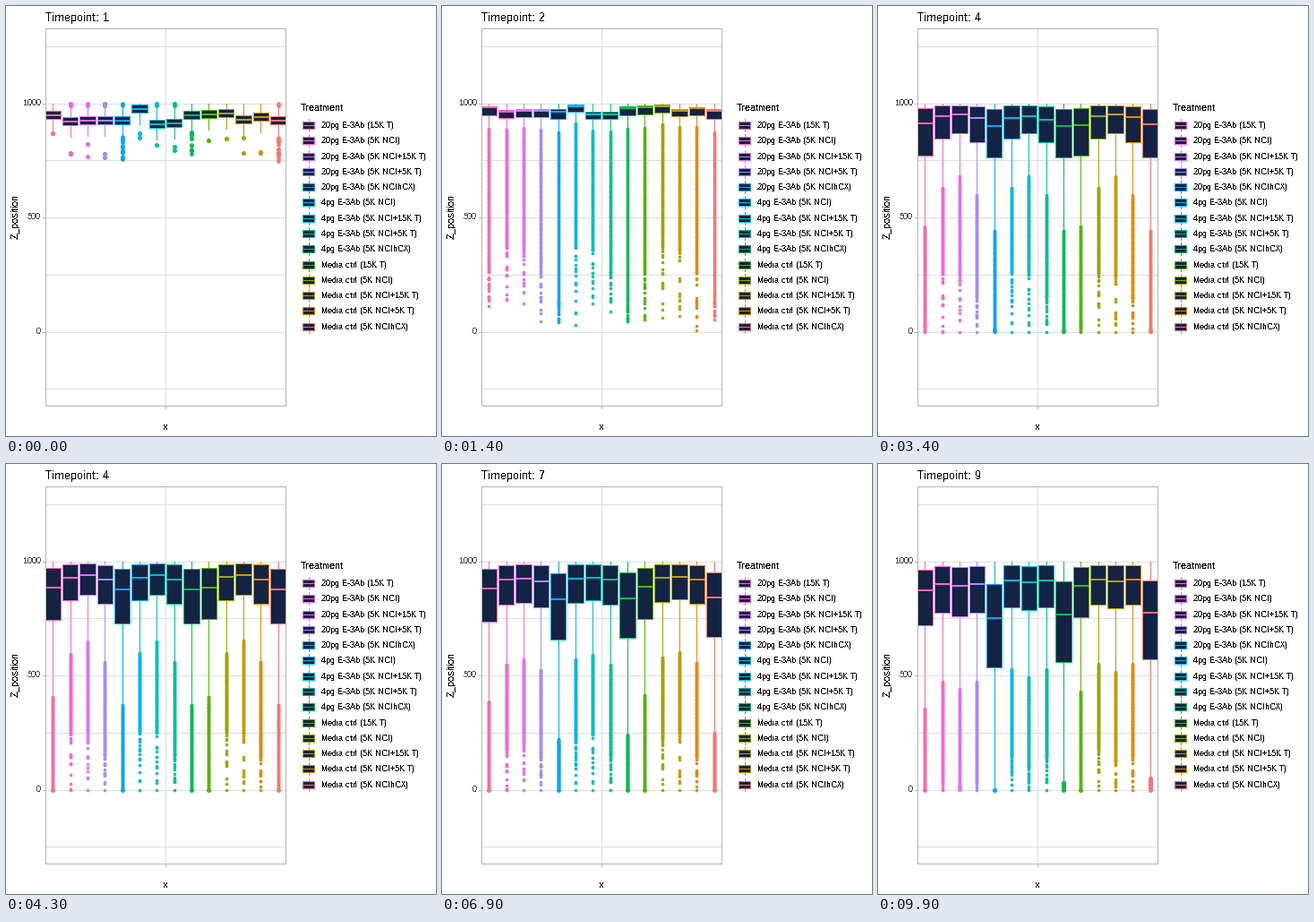
Write a matplotlib script that moves like this. It is 480 px wide and 480 px high and loops after 10000 ms.

```python
import numpy as np
import matplotlib.pyplot as plt
from matplotlib.animation import FuncAnimation
from matplotlib.patches import Rectangle

SIZE, DPI, FRAMES = 480, 72, 100
LEFT, RIGHT, TOP, BOTTOM, MIDDLE = 44, 312, 24, 445, 178
NAVY, BORDER, GRID = "#132343", "#B3B3B3", "#DEDEDE"
COLORS = ["#FF66A8", "#FB61D7", "#DF70F8", "#A58AFF", "#06A4FF", "#00B6EB", "#00BFC4",
          "#00C094", "#00BC56", "#53B400", "#99A800", "#C49A00", "#E38900", "#F8766D"]

# Cells: lower hinge depth below 1000 early and late, height where outliers thin out
CELLS = {"15K T": (255, 245, 150), "5K NCI": (168, 190, 260),
         "5K NCI+15K T": (143, 205, 250), "5K NCI+5K T": (185, 190, 150),
         "5K NCIhCX": (265, 430, 20)}
# Drugs: extra late depth
DRUGS = {"20pg E-3Ab": 35, "4pg E-3Ab": 10, "Media ctrl": 0}
GROUPS = [(d, c) for d in DRUGS for c in CELLS if (d, c) != ("4pg E-3Ab", "15K T")]
N = len(GROUPS)

EARLY, LATE, THIN = np.array([CELLS[c] for _, c in GROUPS], float).T
LATE = LATE + [DRUGS[d] for d, _ in GROUPS]
START = np.array([69, 96, 92, 92, 92, 41, 108, 104, 69, 65, 61, 88, 76, 92.])

CENTERS = MIDDLE + (np.arange(N) - (N - 1) / 2) * 19.33
HALF = 8.7
BODY, TAIL = 130, 16
rng = np.random.default_rng(7)
SCATTER = np.sort(rng.random((N, TAIL)) ** 1.3, axis=1)
SCATTER[:, -1] = 1

plt.rcParams.update({"font.family": "Liberation Sans", "text.hinting": "default",
                     "text.hinting_factor": 1, "text.kerning_factor": 6,
                     "text.antialiased": False})


def ypix(value):
    return 362.5 - 0.255 * np.asarray(value)


def lower_fence(lo, hi):
    return 1000 - lo - 1.5 * (lo - hi)


def pose(lo, med, hi, thin=None, low=0):
    """Rows of hinge and median depths below 1000, then outlier heights."""
    fence = np.maximum(lower_fence(lo, hi), 0)
    if thin is None:
        thin = np.clip(1.5 * (fence - 430), 0, THIN)
    body = np.linspace(fence, thin, BODY, axis=1)
    tail = thin[:, None] + (low - thin)[:, None] * SCATTER
    return np.column_stack([lo, med, hi, body, tail])


def first_pose():
    hi = START - 34
    dots = []
    for k, fence in enumerate(lower_fence(START, hi)):
        count = 16 if GROUPS[k][1] == "5K NCIhCX" else rng.integers(1, 3)
        few = fence - 110 * np.sort(rng.random(count))
        if hi[k] > 56:
            few = np.append([1000, 990], few)
        dots.append(few[np.arange(BODY + TAIL) * few.size // (BODY + TAIL)])
    return np.column_stack([START, START - 17, hi, dots])


def second_pose():
    lo = np.maximum(0.8 * START - 22, 24)
    thin = THIN + 130
    return pose(lo, lo - 14, lo - 20, thin, thin * rng.random(N) * 0.5)


def third_pose():
    bump = np.sin(np.pi * np.arange(N) / (N - 1)) ** 3
    return pose(42 + 0.43 * EARLY, 12 + 36 * bump, np.full(N, 4.))


def late_pose(i):
    lo = EARLY + (LATE - EARLY) * ((i - 37) / 62) ** 1.4
    return pose(lo, 0.35 * lo + 0.0004 * lo ** 2, lo ** 2 / 2200)


KEYS = [(0, first_pose()), (12, second_pose()), (25, third_pose()), (37, late_pose(37))]


def state(i):
    for (fa, a), (fb, b) in zip(KEYS, KEYS[1:]):
        if i <= fb:
            return a + (b - a) * (i - fa) / (fb - fa)
    return late_pose(i)


# Integer data coordinates name pixel columns and rows
fig = plt.figure(figsize=(SIZE / DPI, SIZE / DPI), dpi=DPI, facecolor="white")
ax = fig.add_axes([0, 0, 1, 1])
ax.set(xlim=(0, SIZE), ylim=(SIZE - 1, -1))
ax.axis("off")


def line(xs, ys, color, width=1, z=2):
    return ax.plot(xs, ys, color=color, lw=width, zorder=z, antialiased=False,
                   solid_capstyle="butt")[0]


def box(x, y, w, h, color, fill=NAVY, z=4):
    return ax.add_patch(Rectangle((x, y), w, h, fc=fill, ec=color, lw=1, zorder=z,
                                  antialiased=False))


def text(x, y, s, size, color="black", **kw):
    return ax.text(x, y - 1, s, fontsize=size, color=color, **kw)


# Panel, grid and axes
for v in range(-250, 1251, 250):
    line([LEFT, RIGHT], [ypix(v)] * 2, GRID, z=1)
line([MIDDLE] * 2, [TOP, BOTTOM], GRID, z=1)
line([MIDDLE] * 2, [BOTTOM, BOTTOM + 3], BORDER)
for v in (0, 500, 1000):
    line([LEFT - 3, LEFT], [ypix(v)] * 2, BORDER)
    text(39, ypix(v) + 3.5, str(v), 9, "#4D4D4D", ha="right")
box(LEFT, TOP, RIGHT - LEFT, BOTTOM - TOP, BORDER, "none", 6)
text(MIDDLE, 473, "x", 11, ha="center")
text(11, 235, "Z_position", 11, rotation=90, ha="center", va="center")
title = text(LEFT, 17, "", 13)

# Legend
text(329, 117, "Treatment", 11)
for k, (color, (drug, cells)) in enumerate(zip(COLORS, GROUPS)):
    y = 132 + 17.28 * k
    line([338] * 2, [y - 7, y + 7], color)
    box(331, y - 4, 13, 8, color)
    line([331, 344], [y, y], color, 1, 5)
    text(352, y + 4, f"{drug} ({cells})", 9)

# Box plots
dots, whiskers, boxes, medians = [], [], [], []
for x, color in zip(CENTERS, COLORS):
    dots.append(ax.plot([], [], "o", color=color, ms=3.6, mew=0, zorder=2,
                        antialiased=False)[0])
    whiskers.append(line([x, x], [0, 0], color, 1, 3))
    boxes.append(box(x - HALF, 0, 2 * HALF, 0, color))
    medians.append(line([x - HALF, x + HALF], [0, 0], color, 2, 5))


def update(i):
    title.set_text(f"Timepoint: {round(1 + 8 * i / (FRAMES - 1))}")
    for k, row in enumerate(state(i)):
        (lo, med, hi), outliers = row[:3], row[3:]
        top = min(1000, 1000 - hi + 1.5 * (lo - hi))
        bottom = max(0, lower_fence(lo, hi))
        dots[k].set_data(np.full(outliers.size, round(CENTERS[k])), ypix(outliers))
        whiskers[k].set_ydata(ypix([top, bottom]))
        boxes[k].set_y(ypix(1000 - hi))
        boxes[k].set_height(0.255 * (lo - hi))
        medians[k].set_ydata(ypix([1000 - med] * 2))


anim = FuncAnimation(fig, update, frames=FRAMES, interval=100, repeat=True, repeat_delay=0)
plt.show()
```
